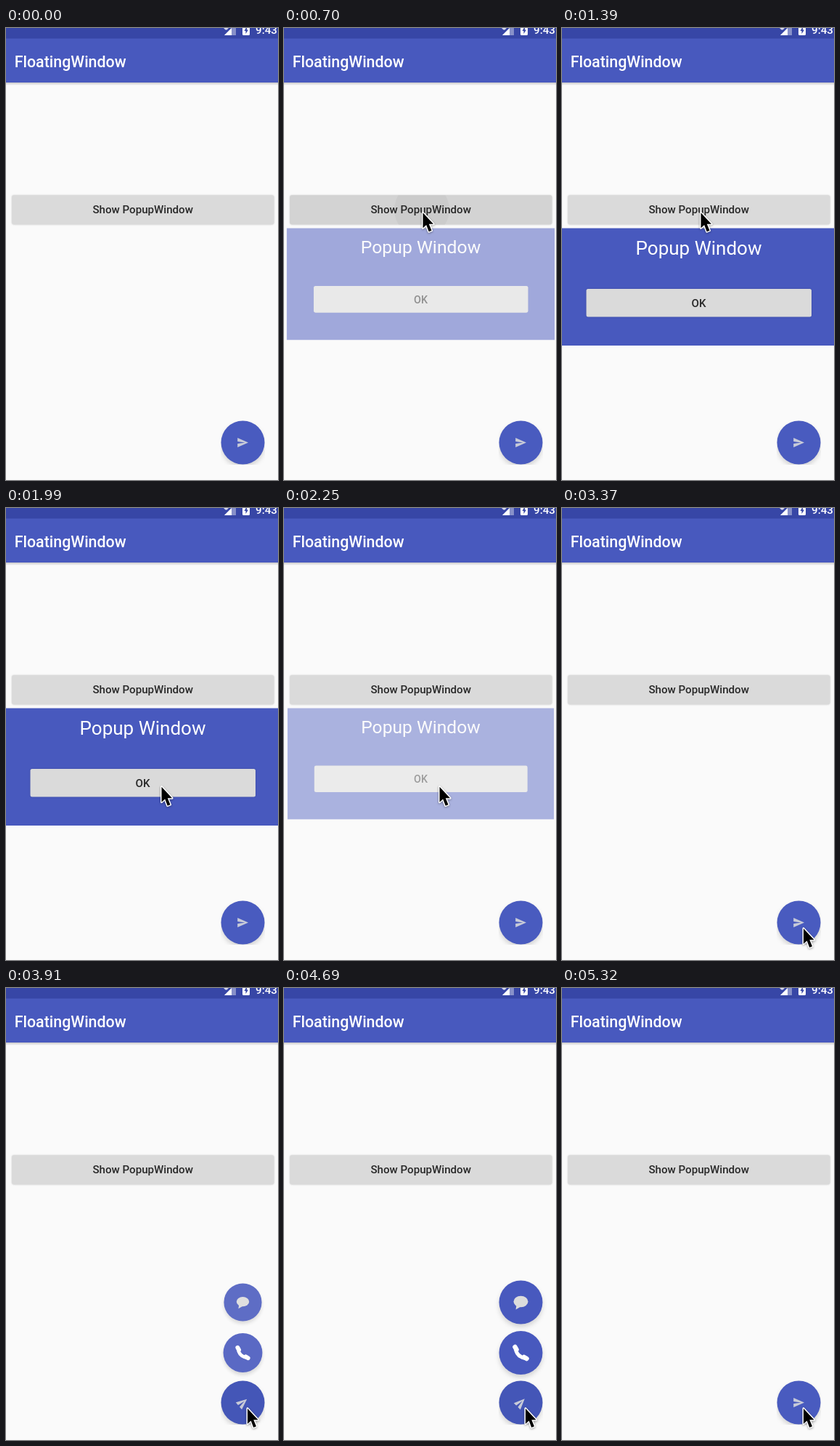
An HTML page for the animation above (5760 ms loop, 375 by 622 pixels).

```html
<!DOCTYPE html>
<html lang="en">
<head>
<meta charset="utf-8">
<title>Floating window demo</title>
<style>
  html, body { margin: 0; width: 100%; height: 100%; overflow: hidden; background: #fafafa; }
  svg { display: block; width: 100%; height: 100%; }
  text { font-family: Roboto, "Noto Sans", sans-serif; font-weight: 500; }
  .label { font-size: 15.1px; fill: #282828; text-anchor: middle; }
  .raised { filter: drop-shadow(0 .6px .8px rgba(0, 0, 0, .16)); }
  .floating { filter: drop-shadow(0 4px 3px rgba(0, 0, 0, .15)); }
  #cursor { filter: drop-shadow(0 1.5px 1.5px rgba(0, 0, 0, .35)); }
</style>
</head>
<body>
<svg viewBox="0 0 375 622">
  <defs>
    <linearGradient id="barShadow" x2="0" y2="1">
      <stop stop-color="#000" stop-opacity=".2"/>
      <stop offset="1" stop-color="#000" stop-opacity="0"/>
    </linearGradient>
    <clipPath id="buttonClip"><rect x="8" y="230" width="362" height="41" rx="3"/></clipPath>
    <clipPath id="fabClip"><rect x="296" y="540" width="61" height="61"/></clipPath>
  </defs>

  <rect width="375" height="622" fill="#fafafa"/>
  <rect y="75" width="375" height="4" fill="url(#barShadow)"/>
  <rect y="14" width="375" height="61" fill="#4859be"/>
  <rect width="375" height="14.5" fill="#3746a6"/>
  <text x="11.7" y="53.5" font-size="21.4" fill="#fff">FloatingWindow</text>

  <!-- status bar -->
  <g fill="#fff">
    <path d="M301 10L317 -6V10Z" opacity=".4"/>
    <path d="M301 10L311 0V10Z"/>
    <path d="M300 0H307L304.5 2.5H302.5Z" opacity=".8"/>
    <rect x="326" y="-5" width="10" height="15" rx="1.5"/>
    <path d="M332 -2L328.5 4H330.5V8L334 2.5H332Z" fill="#3746a6"/>
    <text x="344" y="7.7" font-size="15.2">9:43</text>
  </g>

  <rect id="button" class="raised" x="8" y="230" width="361.5" height="40.5" rx="3"/>
  <circle id="ripple" cx="190" cy="250" r="38" clip-path="url(#buttonClip)"/>
  <text class="label" x="188.7" y="254.9">Show PopupWindow</text>

  <g id="popup">
    <rect x="-194" width="388" height="161.5" fill="#4859be"/>
    <text y="36" font-size="26" text-anchor="middle" fill="#fff" style="font-weight:400">Popup Window</text>
    <rect class="raised" x="-155" y="83.5" width="310.5" height="38.5" rx="2.5" fill="#dadada"/>
    <text class="label" y="108.3">OK</text>
  </g>

  <g id="message">
    <circle class="floating" r="30" fill="#4859be"/>
    <path d="M-6 4L-7 10L0 6Z" fill="#dcdcdc"/>
    <ellipse cy="-1" rx="10" ry="7.7" fill="#dcdcdc"/>
  </g>
  <g id="phone" fill="none" stroke="#fff" stroke-linecap="round">
    <circle class="floating" r="30" fill="#4859be" stroke="none"/>
    <path d="M-7.5 -7Q-6 6 7 7.5" stroke-width="5"/>
    <path d="M-8 -8L-6 -4.500M4.500 6L8 8" stroke-width="6.500"/>
  </g>
  <g clip-path="url(#fabClip)">
    <circle id="fab" class="floating" cx="326.5" cy="570.5" r="30"/>
  </g>
  <path id="send" fill="#c8cbd8" d="M-7.3 6.4L7.5 0L-7.3 -6.4V-1.6L2.8 0L-7.3 1.6Z"/>

  <path id="cursor" d="M0 0V21L4.7 16.7L8.2 26L12 24.5L8.3 15.5H14.5Z"
        stroke="#fff" stroke-width="3" stroke-linejoin="round" paint-order="stroke"/>
</svg>

<script>
const LOOP = 5760;   // ms
const TICK = 86.7;   // ms between redraws of the screen recording
const EARLY = 12;

function set(id, attributes) {
  const element = document.getElementById(id);
  for (const name in attributes) element.setAttribute(name, attributes[name]);
}

// All times below are in ticks.
function draw(tick) {
  const ramp = (from, to) => Math.max(0, Math.min(1, (tick - from) / (to - from)));
  const glide = (from, to) => { const p = ramp(from, to); return p * p * (3 - 2 * p); };
  const during = (from, to) => tick >= from && tick < to;

  // Pointer: enters, reaches the button, then OK, then the floating button.
  const enter = glide(4, 5), toOk = glide(18, 23), toFab = glide(31.6, 39);
  const x = 214 - 22.5 * enter + 23 * toOk + 118.5 * toFab;
  const y = 251 + 3.2 * enter + 129.5 * toOk + 195 * toFab;
  set("cursor", { transform: `translate(${x} ${y})`, visibility: tick < 4 ? "hidden" : "visible" });

  const buttonDown = during(8, 10);
  set("button", { fill: buttonDown ? "#d3d3d3" : "#dadada" });
  set("ripple", { opacity: buttonDown ? .04 : 0 });

  const shown = ramp(7, 9) - ramp(25, 26.8);
  set("popup", { transform: `translate(188.5 275.5) scale(${.904 + .096 * shown})`, opacity: shown });

  const menu = duration => ramp(41, 41 + duration) - ramp(54.5, 54.5 + duration);
  const place = (id, cy, size) =>
    set(id, { transform: `translate(326.5 ${cy}) scale(${size})`, opacity: size });
  place("phone", 502, menu(4.45));
  place("message", 432.5, menu(4.6));
  set("send", { transform: `translate(326.5 570.5) rotate(${-45 * menu(4.45)})` });
  set("fab", { fill: during(41, 47) || during(54, 60) ? "#4456b7" : "#495bbf" });
}

function frame() {
  const now = performance.now() % LOOP;
  draw(Math.floor((now + EARLY) / TICK));
  requestAnimationFrame(frame);
}
frame();
</script>
</body>
</html>
```
